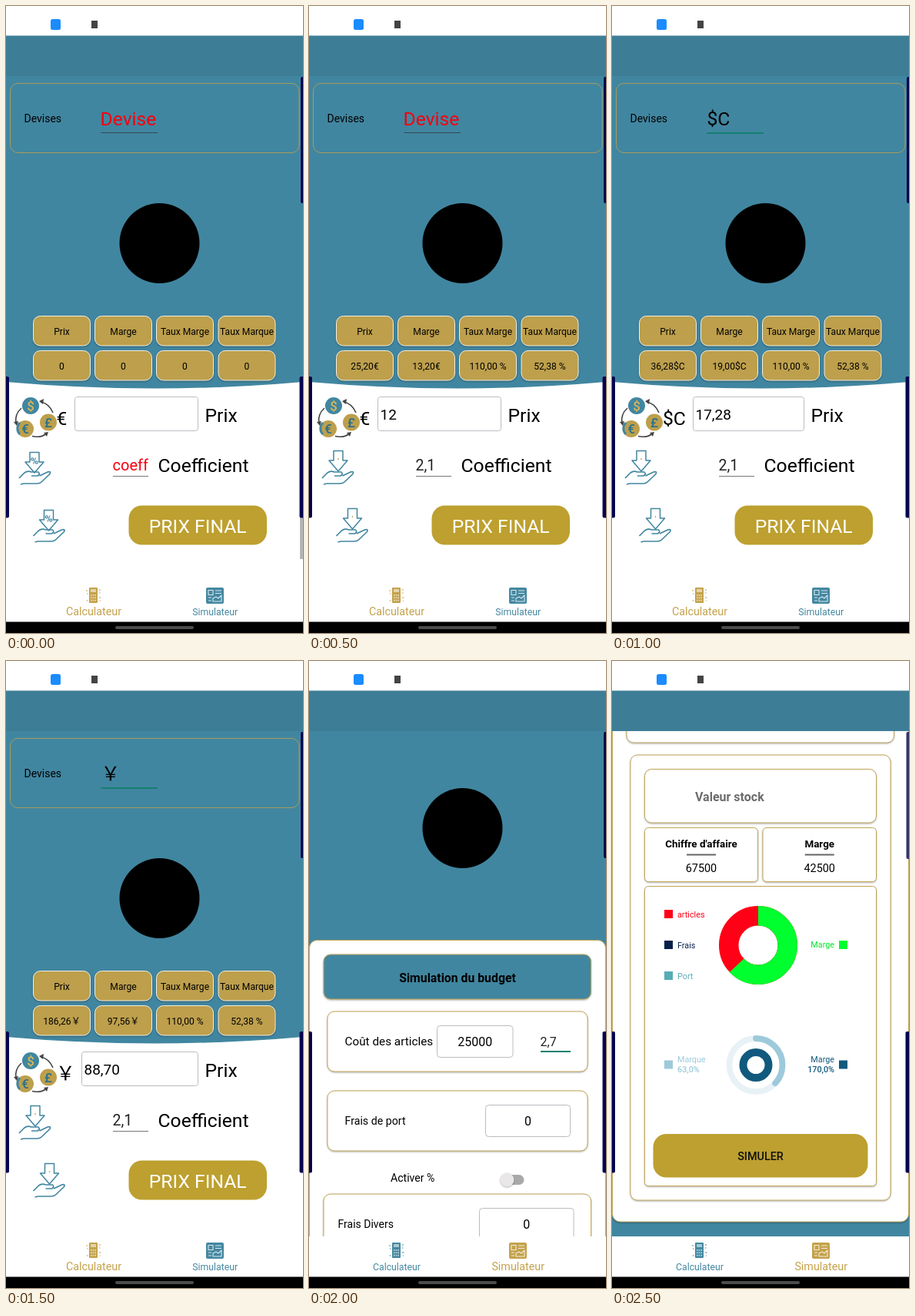
An HTML page that plays this animation: 386 px wide and 814 px high, repeating every 3 s.

```html
<!DOCTYPE html>
<html lang="fr">
<head>
<meta charset="utf-8">
<title>Calculateur de marge</title>
<style>
  html, body { margin: 0; width: 100%; height: 100%; overflow: hidden; background: #fff; }
  svg { display: block; width: 386px; height: 814px; }
  text { font-family: Roboto, "Noto Sans CJK JP", "Noto Sans CJK SC", "Noto Sans CJK", sans-serif; white-space: pre; }
  .raised { filter: drop-shadow(0 1px 1px rgba(0, 0, 0, .3)); }
</style>
</head>
<body>
<svg id="stage" viewBox="0 0 386 814"></svg>
<script>
const LOOP = 3000;
const TEAL = '#4186a0', HEAD = '#3d7d96', GOLD = '#bd9f4c', BUTTON = '#bda02f',
      EDGE = '#c2a556', NAVY = '#04044f', RED = '#f5000f', INPUT = '#bcbcc2';

const rect = (x, y, w, h, r, fill, stroke = 'none', extra = '') =>
  `<rect x="${x}" y="${y}" width="${w}" height="${h}" rx="${r}" fill="${fill}" stroke="${stroke}" ${extra}/>`;
const text = (s, x, y, size, fill = '#000', anchor = 'start', weight = 400) =>
  `<text x="${x}" y="${y}" font-size="${size}" fill="${fill}" text-anchor="${anchor}" font-weight="${weight}">${s}</text>`;
const mid = (s, x, y, size, fill, weight) => text(s, x, y, size, fill, 'middle', weight);
const disc = (x, y, r, fill) => `<circle cx="${x}" cy="${y}" r="${r}" fill="${fill}"/>`;
const ring = (x, y, r, w, color, extra = '') =>
  `<circle cx="${x}" cy="${y}" r="${r}" fill="none" stroke="${color}" stroke-width="${w}" ${extra}/>`;
const line = (d, color, w = 1) =>
  `<path d="${d}" fill="none" stroke="${color}" stroke-width="${w}" stroke-linejoin="round"/>`;
const card = (x, y, w, h, r, fill = '#fff') => rect(x, y, w, h, r, fill, EDGE, 'class="raised"');
const move = (x, y, s) => `<g transform="translate(${x} ${y})">${s}</g>`;
// One digit per half second: 1 = visible
const on = (steps, s) => `<g data-on="${steps}">${s}</g>`;

// Icons
const calcIcon = c => rect(108, 755, 11, 20, 1, c) + rect(110, 757, 7, 4, .5, '#fff8') +
  [0, 1, 2].map(i => [0, 1, 2].map(j => rect(110 + i * 2.7, 764 + j * 3.4, 1.6, 1.7, 0, '#fffa')).join('')).join('') +
  line('M104 759h2M105 763h1.500M104.500 772h2M121 758h2M121 762h1.500M121 768h2.500M122 772h1', c, 1.2);

const simIcon = c => rect(260, 755, 23, 21, 2, c) +
  line('M263 758.500h6v6h-6zM272 759h8M272 762.500h8M263 768h4M263 772h4M269 773v-4l4-2l3 2l4-4v8z', '#fffc', 1.1);

const cycleIcon =
  disc(32, 519, 11, TEAL) + mid('$', 32, 525, 17, '#d8b757', 500) +
  disc(55, 540.5, 11, GOLD) + mid('£', 55, 546.5, 17, '#28718c', 500) +
  disc(25, 549, 11, GOLD) + line('M18 541A10.500 10.500 0 0 0 18 556', TEAL, 3) + mid('€', 25, 555, 17, '#28718c', 500) +
  line('M61 528Q56 516 45 514M20 522Q11 530 13 542M34 558.500Q45 561 52 555.500', '#444', 1.6) +
  '<path d="M43 513l6-3-1 7zM14 545l-4-5 6-1zM55 553l-6 1 4 5z" fill="#444"/>';

const hand = line('M17 613L24 606Q28 603 33 605H42Q45 608 41 610H33M43.500 610L54 605Q59 603.500 57 607.500L46 618Q44 620 40 620H23L19 621', TEAL, 1.7);
const arrow = line('M32 577.500H44V590H50L38 604L26 590H32Z', TEAL, 1.5);
const handEmpty = hand + arrow + disc(38, 588, .9, EDGE);
const handRate = hand + move(-1, 2, arrow +
  `<g transform="rotate(-12 38 588)">${mid('%', 38, 593, 13, TEAL, 700)}</g>`);
const twice = s => s + move(18.5, 75, s);

// Calculator screen
const cols = [35.5, 115.5, 195.5, 276];
const cell = (x, y) => rect(x, y, 74, 38.5, 9, GOLD, '#f3f0e4', 'class="raised"');
const results = (y, values) => values.map((v, i) => mid(v, cols[i] + 37, y, 12.1)).join('');

const entry = (unit, unitX, fieldX, value, cells) =>
  text(unit, unitX, 543.5, 24.7) +
  rect(fieldX + .5, 507.5, 249 - fieldX, 44, 3, '#fff', INPUT) +
  text(value, fieldX + 3.5, 536.5, 19) +
  results(471.5, cells);
const currency = s => text(s, 123.5, 155, 24.7) + line('M123.500 165H197', '#12806f', 2);

const calculator =
  `<path d="M0 91H386V488Q193 505 0 488Z" fill="${TEAL}"/>` +
  rect(5.5, 100.5, 375.5, 90, 10, 'none', '#a99c5c') +
  text('Devises', 23.5, 151, 14) +
  disc(199.5, 308, 52, '#000') +
  cols.map(x => cell(x, 402.5) + cell(x, 447.5)).join('') +
  results(426.5, ['Prix', 'Marge', 'Taux Marge', 'Taux Marque']) +
  cycleIcon +
  text('Prix', 258.5, 539.5, 24.7) +
  text('Coefficient', 197.5, 605, 24.7) +
  rect(159.5, 648.5, 179.5, 51, 17, BUTTON) +
  mid('PRIX FINAL', 249.2, 683.8, 24.7, '#fff') +
  on('110000', text('Devise', 122.5, 155, 24.7, RED) + line('M123.500 164.500H197', '#334a55')) +
  on('001000', currency('$C')) +
  on('000100', currency('￥')) +
  on('100000', entry('€', 65.5, 89, '', ['0', '0', '0', '0']) + twice(handRate) +
    text('coeff', 138.5, 603, 20, RED) + rect(382, 664, 4, 54, 0, '#b5b5b5')) +
  on('011100', twice(handEmpty) + text('2,1', 138.5, 603, 19.5, '#222')) +
  line('M139 610.500H185', '#777') +
  on('010000', entry('€', 65.5, 89, '12', ['25,20€', '13,20€', '110,00 %', '52,38 %'])) +
  on('001000', entry('$C', 66, 105, '17,28', ['36,28$C', '19,00$C', '110,00 %', '52,38 %'])) +
  on('000100', entry('￥', 65, 98, '88,70', ['186,26￥', '97,56￥', '110,00 %', '52,38 %']));

// Simulator, top of the page
const field = (x, y, w, value) =>
  rect(x + .5, y + .5, w, 41, 4, '#fff', INPUT) + mid(value, x + w / 2 + .5, y + 26.8, 16);

const budget =
  rect(0, 91, 386, 656, 0, TEAL) +
  disc(199.5, 217, 52, '#000') +
  rect(.5, 362.5, 385, 420, 10, '#fff', EDGE) +
  card(19, 381, 347.5, 58, 9, TEAL) +
  mid('Simulation du budget', 193, 416.5, 15.8, '#000', 700) +
  card(24, 455, 338, 78, 9) +
  text('Coût des articles', 46.5, 499, 15.3) + field(166, 473, 98.5, '25000') +
  text('2,7', 300.5, 500, 16, '#222') + line('M301 507H340', '#12806f', 2) +
  card(24, 558, 338, 78, 9) +
  text('Frais de port', 46.5, 602, 14.2) + field(229, 576, 110, '0') +
  text('Activer %', 106, 676, 14.1) +
  rect(251, 667, 28.5, 13, 6.5, '#a9a9a9') +
  `<g class="raised">${disc(257.5, 673.5, 9, '#e9e7e7')}</g>` +
  card(19, 692, 347.5, 90, 9) +
  text('Frais Divers', 37.5, 736, 14) + field(221, 710, 122.5, '0');

// Simulator, bottom of the page
const legend = (y, label, color, extra = '') =>
  rect(68, y, 11, 11, 0, color) + text(label, 85, y + 10, 10.8, color) + extra;
const figure = (x, w, label, value) => {
  const c = x + w / 2;
  return card(x, 216.5, w, 70, 5) + mid(label, c, 241.5, 13.4, '#000', 700) +
    line(`M${c - 19} 251.500h38`, '#666', 2) + mid(value, c, 274, 14.4);
};
const arc = (part, color, cap = 'butt') =>
  `pathLength="100" stroke-dasharray="${part} 100" stroke-linecap="${cap}" transform="rotate(-90 ${color})"`;

const report =
  rect(0, 91, 386, 656, 0, TEAL) +
  card(.5, 60, 385, 668, 10) +
  card(19, 60, 347.5, 46, 9) +
  card(24, 122, 338, 578, 9) +
  card(42.5, 140.5, 301, 69.5, 9) +
  text('Valeur stock', 108, 181.7, 16, '#6c6c6c', 'start', 700) +
  figure(42.5, 147, "Chiffre d'affaire", '67500') +
  figure(196, 147.5, 'Marge', '42500') +
  card(42.5, 292.5, 301, 389, 5) +
  ring(190, 369, 38.25, 25.5, '#ff0016') +
  ring(190, 369, 38.25, 25.5, '#00ff2f', arc(63, '190 369')) +
  legend(323, 'articles', '#ff0016') +
  legend(363, 'Frais', '#06214a') +
  legend(403, 'Port', '#55adb5') +
  text('Marge', 289, 372, 10.8, '#00e52a', 'end') + rect(295, 363, 11, 11, 0, '#00ff2f') +
  ring(187, 524.5, 34.5, 7.8, '#e8f2f6') +
  ring(187, 524.5, 34.5, 7.8, '#9dcadb', arc(37, '187 524.5', 'round')) +
  ring(187, 524.5, 16.5, 10, '#115a7d') +
  rect(68, 518.5, 11, 11, 0, '#9dcadb') +
  text('Marque', 85, 521, 10.8, '#9dcadb') +
  text('63,0%', 85, 534, 10.8, '#9dcadb', 'start', 500) +
  text('Marge', 289, 521, 10.8, '#115a7d', 'end') +
  text('170,0%', 289, 534, 10.8, '#115a7d', 'end', 500) +
  rect(295, 518.5, 11, 11, 0, '#115a7d') +
  rect(53.5, 614, 279, 56.5, 17, BUTTON) +
  mid('SIMULER', 193, 648, 14.4, '#111', 500);

// Navigation bar
const tabs = (calc, sim) => {
  const tint = active => active ? '#c4a24b' : '#4488a1';
  const size = active => active ? 14.3 : 12.3;
  return calcIcon(tint(calc)) + mid('Calculateur', 114, 790.5, size(calc), tint(calc)) +
    simIcon(tint(sim)) + mid('Simulateur', 271.7, 790.5, size(sim), tint(sim));
};

const stage = document.getElementById('stage');
stage.innerHTML =
  rect(0, 0, 386, 814, 0, '#fff') +
  on('111100', calculator) + on('000010', budget) + on('000001', report) +
  rect(0, 0, 386, 38.5, 0, '#fff') +
  rect(0, 38.5, 386, 52.5, 0, HEAD) +
  rect(58, 17, 13, 14, 2.5, '#1a8cff') +
  rect(111, 19, 8, 10, 0, '#444') +
  on('111110', rect(383, 92, 6, 164, 2, NAVY)) +
  on('000001', rect(382.5, 92, 6, 165, 2, '#34346c')) +
  rect(-3, 481, 7, 183.5, 2, NAVY) +
  rect(381.5, 481, 7, 183.5, 2, NAVY) +
  rect(0, 747, 386, 52, 0, '#fff') +
  on('111100', tabs(true, false)) + on('000011', tabs(false, true)) +
  rect(0, 799.5, 386, 15, 0, '#000') +
  rect(142, 805, 102, 4, 2, '#4c4c4c');

for (const el of stage.querySelectorAll('[data-on]')) {
  const steps = [...el.dataset.on];
  const frames = [...steps, steps[0]].map((v, i) =>
    ({ opacity: +v, offset: i / steps.length, easing: 'steps(1, end)' }));
  el.animate(frames, { duration: LOOP, iterations: Infinity });
}
</script>
</body>
</html>
```
